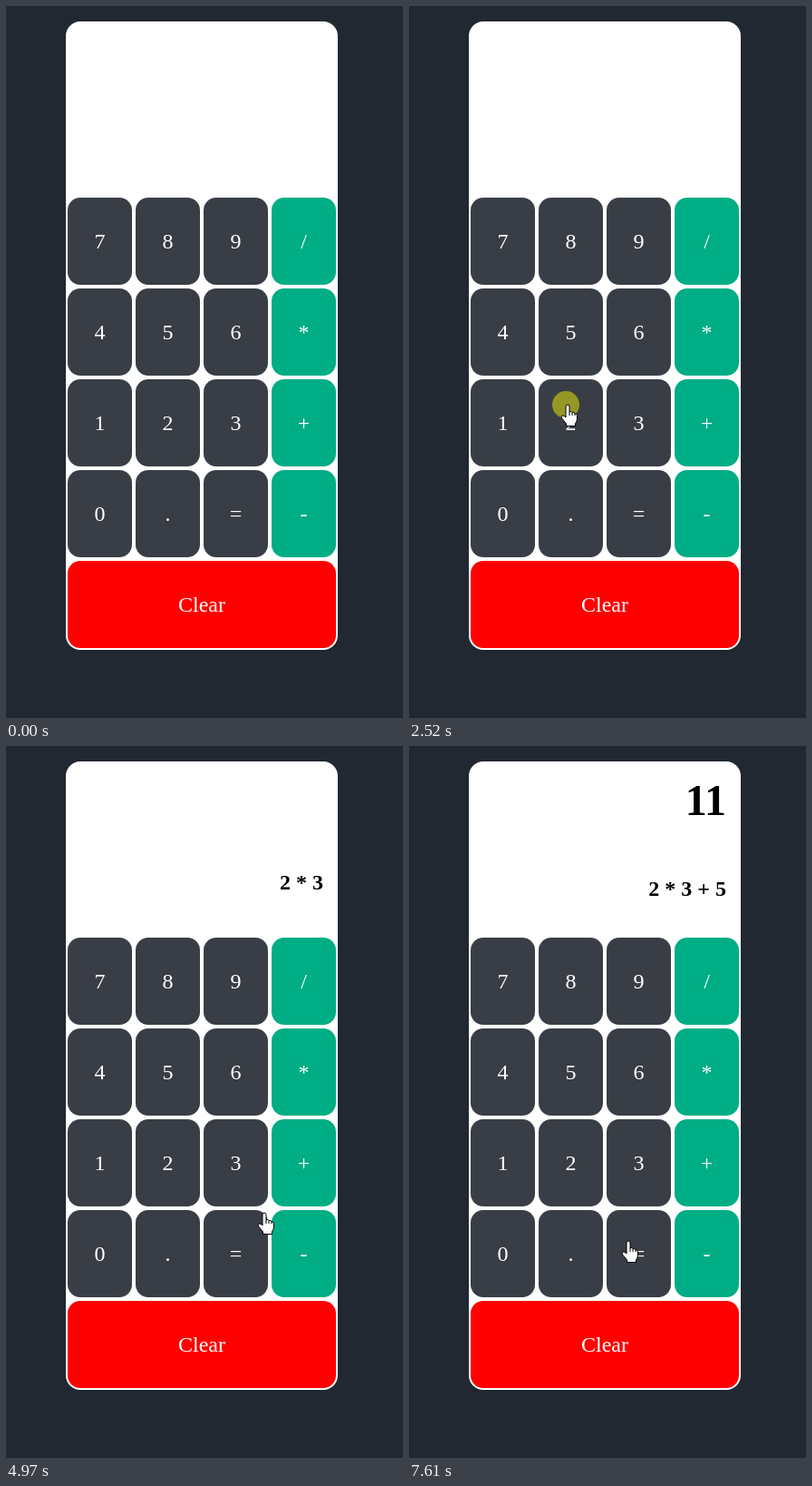
These frames come from a looping animation (438x784 px, 8000 ms). An HTML page:

```html
<!DOCTYPE html>
<html lang="en">
<head>
<meta charset="utf-8">
<title>Calculator</title>
<style>
  html, body { margin: 0; width: 100%; height: 100%; overflow: hidden; background: #222831; }
  svg { display: block; }
  text { font: 24px "Liberation Serif", "Times New Roman", serif; fill: #fff; text-anchor: middle; }
  #sum, #result { fill: #000; font-weight: bold; text-anchor: end; }
  #result { font-size: 48px; }
  #cursor path { fill: #fff; stroke: #000; stroke-linejoin: round; }
</style>
</head>
<body>
<svg width="438" height="784">
  <rect x="66" y="17" width="300" height="692" rx="16" fill="#fff"/>
  <text id="result" x="350" y="76"></text>
  <text id="sum" x="350" y="158"></text>
  <g id="keys"></g>
  <circle id="click" r="15" fill="#ff0" fill-opacity=".47"/>
  <g id="cursor">
    <path id="arrow" d="M0 0V17L4 13 7 19 9 18 6.5 12H12Z"/>
    <g id="hand">
      <path d="M-2 2Q-2 0 0 0T2 2V8Q4.500 6.500 5 8.800Q7.500 7.500 8 10Q10.500 9 10.500 12V16Q10 19 8.500 21V23.500H-1.500V21L-6 15.500Q-8 12.500 -6 12Q-4 11.500 -2 14Z"/>
      <path d="M2 8V12M5 9V12M8 10V12"/>
    </g>
  </g>
</svg>
<script>
const LOOP = 8000, STEP = 66.2, PRESS = 130;
const $ = id => document.getElementById(id);

function addKey(label, x, y, width, fill) {
  $('keys').insertAdjacentHTML('beforeend',
    `<rect x="${x}" y="${y}" width="${width}" height="96" rx="14" fill="${fill}"/>
     <text x="${x + width / 2}" y="${y + 56}">${label}</text>`);
}
['789/', '456*', '123+', '0.=-'].forEach((row, r) =>
  [...row].forEach((label, c) =>
    addKey(label, 68 + 75 * c, 211 + 100 * r, 71, c === 3 ? '#00ad85' : '#393e46')));
addKey('Clear', 68, 611, 296, '#f00');

// Stops of the pointer; a stop with a key is held for one press
const stops = [
  { t: 260, x: 410, y: 775 },
  { t: 860, x: 165, y: 304 },
  { t: 1130, x: 146, y: 338 },
  { t: 1590, x: 179, y: 407 },
  { t: 1990, x: 265, y: 532 },
  { t: 2520, x: 175, y: 439, key: '2' },
  { t: 3250, x: 320, y: 370, key: '*' },
  { t: 4110, x: 251, y: 472, key: '3' },
  { t: 4800, x: 266, y: 535 },
  { t: 5350, x: 352, y: 440 },
  { t: 5640, x: 315, y: 451, key: '+' },
  { t: 6100, x: 168, y: 360, key: '5' },
  { t: 6720, x: 222, y: 636 },
  { t: 7280, x: 242, y: 545 },
  { t: 7480, x: 242, y: 545, key: '=' }
];
const presses = stops.filter(s => s.key);

function pointer(t) {
  const next = stops.findIndex(s => s.t > t);
  if (next < 1) return next ? stops[stops.length - 1] : stops[0];
  const a = stops[next - 1], b = stops[next];
  const leave = a.t + (a.key ? PRESS : 0);
  const u = Math.max(0, (t - leave) / (b.t - leave));
  const ease = u * u * (3 - 2 * u);
  return {
    x: Math.round(a.x + (b.x - a.x) * ease),
    y: Math.round(a.y + (b.y - a.y) * ease)
  };
}

const show = (id, on) => $(id).setAttribute('visibility', on ? 'visible' : 'hidden');

function draw(now) {
  const t = now % LOOP;
  const { x, y } = pointer(Math.floor((t + 10) / STEP) * STEP);
  const inside = x < 366 && y < 709, visible = t >= 260;
  $('cursor').setAttribute('transform', `translate(${x} ${y})`);
  show('arrow', visible && !inside);
  show('hand', visible && inside);

  $('click').setAttribute('cx', x - 2);
  $('click').setAttribute('cy', y);
  show('click', presses.some(p => t >= p.t && t < p.t + PRESS));

  const typed = presses.filter(p => t >= p.t + PRESS).map(p => p.key);
  const solved = typed.includes('=');
  $('sum').textContent = typed.filter(key => key !== '=').join(' ');
  $('sum').setAttribute('y', solved ? 165 : 158);
  $('result').textContent = solved ? '11' : '';
}

const start = performance.now();
function frame() {
  draw(performance.now() - start);
  requestAnimationFrame(frame);
}
frame();
</script>
</body>
</html>
```
